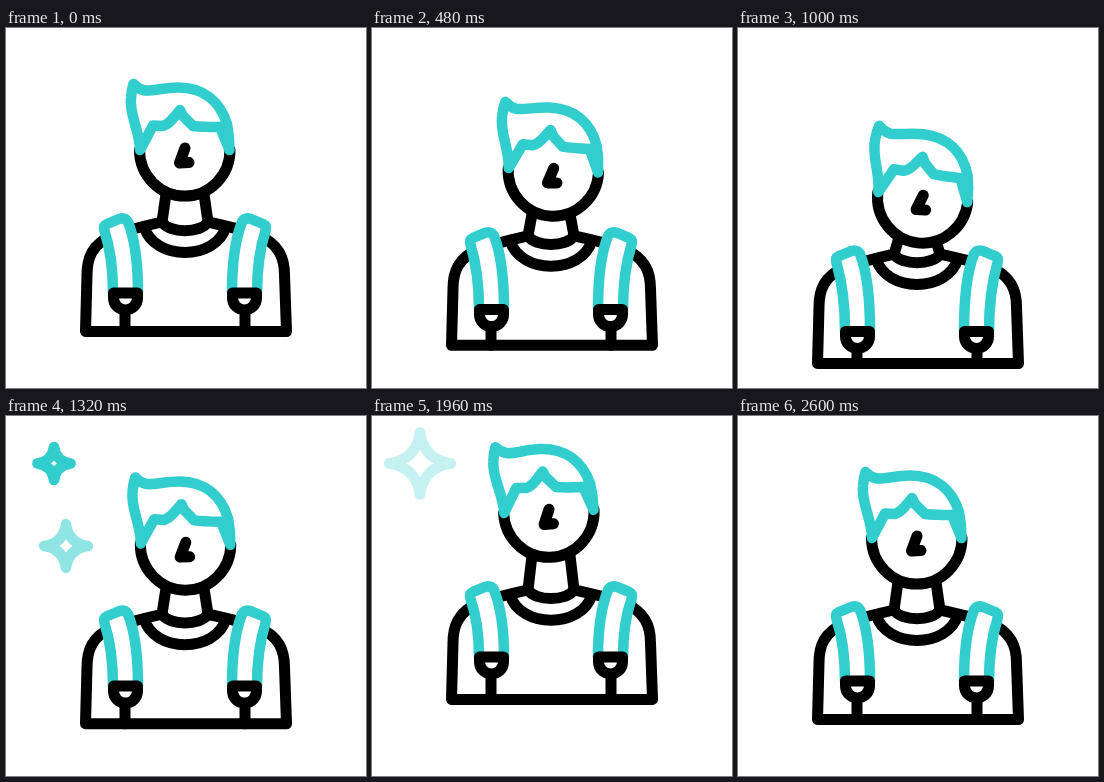
Recreate the animation shown at these times as an HTML page. Size 360x360 px, loop 3 s.

```html
<!DOCTYPE html>
<html lang="en">
<head>
<meta charset="utf-8">
<title>Traveller</title>
<style>
  html, body { margin: 0; width: 100%; height: 100%; overflow: hidden; background: #fff; }
  svg { display: block; width: 100vw; height: 100vh; }
  path { fill: none; stroke: #000; stroke-width: 11; stroke-linecap: round; stroke-linejoin: round; }
  .teal { stroke: #32cdcd; stroke-width: 10.5; }
  .solid { fill: #fff; }
</style>
</head>
<body>
<svg viewBox="0 0 360 360">
  <defs>
    <g id="side">
      <path class="teal solid strap"/>
      <path class="buckle"/>
    </g>
  </defs>
  <path id="neck"/>
  <g id="body">
    <path d="M156 194 Q125 201 107 207 C86 216 81 230 81 247 L79.5 303.5 H280.5 L278.5 247 C278.5 230 273 216 252 207 Q235 201 202 194"/>
    <path d="M138 198.5 C148 233 210 233 220 198.5"/>
    <path d="M156 194 C163 205.5 195 205.5 202 194"/>
    <use href="#side"/>
    <use href="#side" transform="translate(358 0) scale(-1 1)"/>
  </g>
  <g id="head">
    <path class="solid" d="M133.5 122 A45.25 46 0 0 0 224 122"/>
    <path class="teal solid" d="M134 122 C134 103 123 87 125 70 Q125.5 62 127.5 56
      Q132 61 139 62.5 C149 63 158 59.5 172 59.5 C197 59.5 214 73 221 96 Q223.5 108 223.5 122
      L214 99 Q195 99 187 98 L177 88 L174 82 L169 88 Q163 96 157 98 L147 97.5 Z"/>
    <path d="M179 120 L173.5 135 L183 134.5"/>
  </g>
  <path id="starA" class="teal"/>
  <path id="starB" class="teal"/>
</svg>
<script>
const LOOP = 3000, STEP = 40;
const $ = s => document.querySelector(s);
const clamp = x => Math.min(1, Math.max(0, x));
const ease = p => (1 - Math.cos(Math.PI * p)) / 2;

// time, vertical offset of the body
const BOB = [[0, 0], [160, 0], [880, 33.5], [920, 33.5], [1720, -25], [2540, 0], [LOOP, 0]];

function bob(t) {
  if (t < 240) return 0;
  const i = BOB.findIndex(k => k[0] > t);
  const [t0, a] = BOB[i - 1], [t1, b] = BOB[i];
  return a + (b - a) * ease((t - t0) / (t1 - t0));
}

function star(el, x, y, r, alpha) {
  const c = 0.12 * r;
  el.setAttribute('d', `M${x} ${y - r} Q${x + c} ${y - c} ${x + r} ${y} Q${x + c} ${y + c} ${x} ${y + r}
    Q${x - c} ${y + c} ${x - r} ${y} Q${x - c} ${y - c} ${x} ${y - r}Z`);
  el.style.opacity = alpha;
}

function drawStars(t) {
  const p = clamp((t - 1110) / 660);
  star($('#starA'), 48, 47.5, 31 * (1 - (1 - p) ** 2), p > 0 ? clamp((2020 - t) / 220) : 0);

  // two short pulses
  const age = t >= 1400 ? t - 1400 : t - 1020;
  star($('#starB'), 60, 130, Math.max(0, 0.073 * age), age > 0 ? clamp((360 - age) / 110) : 0);
}

function draw(t) {
  const y = bob(t), down = y > 0;
  const headY = y * (down ? 1.46 : 1.33);
  const turn = y * (down ? 0.2 : 0.1);
  const drop = y * 0.2;

  $('#body').setAttribute('transform', `translate(0 ${y})`);
  $('#head').setAttribute('transform', `translate(0 ${headY}) rotate(${turn} 179 176)`);
  $('#neck').setAttribute('d', `M160 ${166 + headY} L156 ${194 + y} M198 ${166 + headY} L202 ${194 + y}`);

  const b = 265 + drop;
  $('.strap').setAttribute('d', `M107 ${b} Q107 ${229 + drop / 2} 98.5 203 Q97 198 101 196 L113 191
    Q119 189 122 194 Q132 219 132 ${b}`);
  $('.buckle').setAttribute('d', `M107.5 ${b} H131.5 V${b + 5} A12 12 0 0 1 107.5 ${b + 5} Z
    M119 ${b + 17} V303.5`);
  drawStars(t);
}

const start = performance.now();
function tick() {
  const t = (performance.now() - start) % LOOP;
  draw(Math.floor(t / STEP) * STEP);
  requestAnimationFrame(tick);
}
tick();
</script>
</body>
</html>
```
